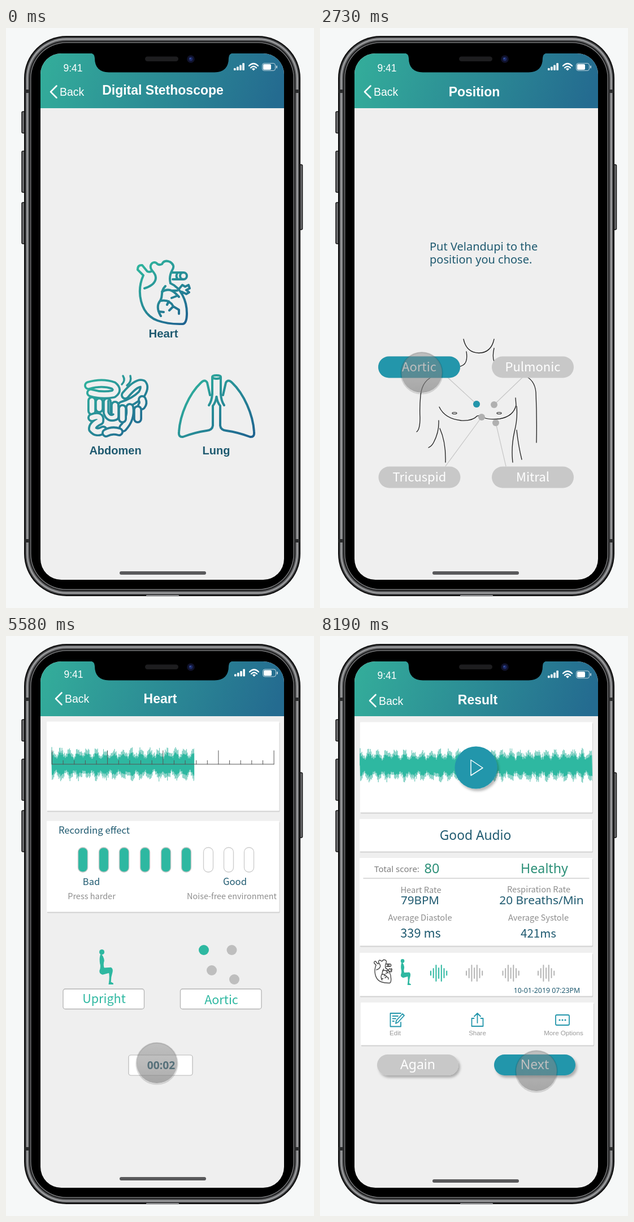
These frames come from a looping animation (545 by 1027 pixels, 8220 ms). An HTML page:

```html
<!DOCTYPE html>
<html lang="en">
<head>
<meta charset="utf-8">
<title>Digital Stethoscope</title>
<style>
html, body { margin: 0; width: 100%; height: 100%; overflow: hidden; background: #f6f8f8; }
svg { display: block; width: 545px; height: 1027px; }
.l { font-family: "Liberation Sans", Arial, sans-serif; }
.b { font-family: "Liberation Sans", Arial, sans-serif; font-weight: bold; }
.n { font-family: "Noto Sans", "Open Sans", sans-serif; }
.c { font-family: "Noto Sans CJK SC", "Noto Sans CJK JP", "Noto Sans CJK", sans-serif; }
.line { fill: none; stroke-linecap: round; stroke-linejoin: round; }
</style>
</head>
<body>
<svg id="stage" viewBox="0 0 545 1027"></svg>
<script>
const INK = '#1f5a70', TEAL = '#2eb8a1', BLUE = '#2396ab', GRAY = '#c8c8c8';
const $ = id => document.getElementById(id);

// ---- drawing helpers ----
const text = (x, y, size, str, fill = INK, cls = 'n', anchor = 'middle') =>
  `<text x="${x}" y="${y}" font-size="${size}" fill="${fill}" class="${cls}" text-anchor="${anchor}">${str}</text>`;
const rect = (x, y, w, h, r, fill, more = '') =>
  `<rect x="${x}" y="${y}" width="${w}" height="${h}" rx="${r}" fill="${fill}" ${more}/>`;
const dot = (x, y, r, fill, more = '') => `<circle cx="${x}" cy="${y}" r="${r}" fill="${fill}" ${more}/>`;
const line = (d, stroke, width, more = '') =>
  `<path class="line" d="${d}" stroke="${stroke}" stroke-width="${width}" ${more}/>`;
const group = (id, body, more = '') => `<g id="${id}" ${more}>${body}</g>`;
const card = (x, y, w, h) => rect(x + 1, y + 2, w, h, 1, '#d2d2d2') + rect(x, y, w, h, 1, '#fff');
const pill = (x, y, w, h, fill, label, by, cls, size, more = '') =>
  rect(x, y, w, h, h / 2, fill, more) + text(x + w / 2, by, size, label, '#fff', cls);
const noise = i => { const v = Math.sin(i * 12.9898) * 43758.5453; return v - Math.floor(v); };

function header(title, cx, base, o = {}) {
  const { sx = 0, sy = 0, bx = 0, by = 0, hx = 201, hy = 965 } = o;
  const bars = [4, 6.5, 9.5, 13].map((h, i) => rect(403 + i * 5.1, 75 - h, 3.6, h, 1, '#fff')).join('');
  return rect(61, 45, 431, 97, 0, 'url(#head)') +
    `<g transform="translate(${sx} ${sy})">` + text(118.5, 77, 17.5, '9:41', '#fff', 'l') + bars +
    line('M430 67 Q438 59 446 67 M433 70.5 Q438 65.5 443 70.5', '#fff', 2.3) +
    '<path d="M435 72.5 Q438 70 441 72.5 L438 75.5Z" fill="#fff"/>' +
    rect(453.5, 62.5, 23, 13, 3.5, 'none', 'stroke="#fff" stroke-opacity=".7"') +
    rect(455, 64, 14, 10, 2, '#fff') + rect(478, 66.5, 2, 5, 1, '#fff', 'opacity=".7"') + '</g>' +
    `<g transform="translate(${bx} ${by})">` + line('M89.5 102.5 L79 113 L89.5 123.5', '#fff', 2.6) +
    text(95, 120, 19.5, 'Back', '#fff', 'l', 'start') + '</g>' +
    text(cx, base, 23, title, '#fff', 'b') + rect(hx, hy - 3, 153, 6, 3, '#59595b');
}

// Dense zigzag: pale full-height layer under a solid core
function wave(x0, x1, cy) {
  const layer = k => {
    let d = `M${x0} ${cy}`;
    for (let x = x0, i = 0; x < x1; x += 1.5, i++) {
      const beat = .38 + .34 * Math.abs(Math.cos(Math.PI * (x - x0) / 15.7)) ** 2;
      const up = 31 * k * (beat + .28 * noise(i + 1)), down = 31 * k * (beat + .28 * noise(i + 500));
      d += `L${x.toFixed(1)} ${(cy - up).toFixed(1)}L${(x + .7).toFixed(1)} ${(cy + down).toFixed(1)}`;
    }
    return d;
  };
  return line(layer(1), '#54bfae', 1, 'opacity=".65"') + line(layer(.68), TEAL, 1.5);
}

// ---- icons ----
const heart = line(`M233 428 Q233 419 241 420 L250 431 Q254 433 259 430 M233 428 L243 438
  C231 465 236 506 268 518 Q288 525 313 524 Q320 523 320 505 C320 482 309 460 291 452
  M259 430 C252 422 258 412 266 416 Q270 421 276 418 Q280 410 290 414 Q300 420 294 429 Q288 440 291 452
  M259 430 C272 444 262 456 245 461
  M295 433 H313 M295 445 H313 M304 433 Q299 439 304 445 M308 439 A6 6 0 1 0 320 439 A6 6 0 1 0 308 439
  M307 461 L312 455 L317 458 L323 455 L325 461 L319 464 L324 468 L319 471 L311 467
  M282 457 C272 467 279 476 272 484 C267 491 268 500 274 510 M276 467 Q289 459 300 470 L306 476 M294 465 L303 465
  M273 483 Q290 480 296 493 L289 500 M296 493 L306 499 V506 M285 490 L288 484 M270 502 L279 503 M301 475 L293 478`,
  'inherit', 4);

const tubes = [
  'M146 633 Q170 626 190 633 Q200 641 190 648 Q170 652 150 646', 'M152 660 V678', 'M165 662 V674',
  'M179 662 V681 Q182 692 193 688 V668', 'M205 668 Q226 662 240 648 Q247 636 242 630 Q232 625 211 650',
  'M241 658 Q244 664 240 669', 'M233 676 V692', 'M219 672 Q222 692 207 708', 'M206 674 V692',
  'M152 690 Q168 684 166 696 Q153 702 153 710 Q160 719 172 712', 'M177 717 Q188 711 200 715'];
const abdomen = tubes.map(d => line(d, 'url(#organ)', 16) + line(d, '#efefef', 8.5)).join('') +
  line('M205 631 Q212 624 207 616 M214 633 Q223 626 220 616 M181 660 V680 Q184 688 190 684', 'url(#organ)', 3.5);

const lung = line(`M313 724 Q305 725 306 715 C308 684 324 648 345 628 Q352 621 356 628 L361 650
  M365 618 V648 Q364 661 359 668 M372.5 653 Q371 663 366 669 V704 Q365 712 355 713 Q334 716 313 724
  M365 618 Q365 615 372.5 615 M365 618 Q366 621 372.5 621`, 'inherit', 4);

const sitter = `<path d="M158 599 Q166 603 167 616 Q164 625 167 633 L184 632 Q190 635 188 644 Q184 656 184 668 L190 671
  V674 H178 Q181 658 179 646 L163 650 Q154 648 155 640 Q159 630 156 622 Q154 607 158 599Z"/><circle cx="161" cy="594.5" r="6.5"/>`;
const sitAt = (x, y, sx, sy, fill) =>
  `<g fill="${fill}" transform="translate(${x} ${y}) scale(${sx} ${sy}) translate(-153 -588)">${sitter}</g>`;

// ---- screens ----
const organs = header('Digital Stethoscope', 277.5, 118) +
  `<g stroke="url(#organ1)">${heart}</g>` + abdomen +
  `<g stroke="url(#organ2)">${lung}</g><g stroke="url(#organ3)" transform="translate(745 0) scale(-1 1)">${lung}</g>` +
  text(278.5, 548, 20.4, 'Heart', INK, 'b') + text(193.5, 755, 20, 'Abdomen', INK, 'b') + text(372, 755, 20, 'Lung', INK, 'b');

const upright = fill => sitAt(153, 588, 1, 1, fill) + pill(96, 697, 153, 38, fill, 'Upright', 723, 'n', 23.2);
const posture = header('Posture', 273, 121) +
  text(141, 394, 20, 'Choose the position you will', INK, 'n', 'start') +
  text(141, 417, 20, 'be diagnosed with.', INK, 'n', 'start') +
  upright(GRAY) + group('uprightOn', upright(BLUE)) +
  `<path d="M326 645 Q327 638 335 638 Q340 641 344 638 Q355 636 362 641 Q372 637 385 638 Q395 640 402 643 Q420 646 428 647
    L433 640 L435 642 Q434 650 430 652 Q410 650 400 651 Q380 654 362 650 Q350 654 340 649 Q327 654 326 645Z" fill="${GRAY}" stroke="#a9cdd8" stroke-width=".8"/>` +
  pill(303, 696.5, 154.5, 38, GRAY, 'Laying Down', 723, 'c', 22.2, 'stroke="#b4d0da" stroke-width=".8"');

const site = (x, y, label, fill = GRAY) => pill(x, y, 145, 38, fill, label, y + 26, 'c', 22);
const position = header('Position', 273, 121, { hx: 199 }) +
  text(194, 394, 20, 'Put Velandupi to the', INK, 'n', 'start') +
  text(194, 417, 20, 'position you chose.', INK, 'n', 'start') +
  line('M226 619 L277 666 M358 619 L308 667 M222 776 L286 689 M329 776 L311 699', '#c6c6c6', 1.2) +
  line(`M254 551 Q259 575 281 575.5 Q303 575 308 551 M259 573 Q262 592 253 597 Q248 600 242 601
    M308 567 Q303 589 313 598 M205 615 Q181 622 178 650 Q176 672 177 690 Q177 711 171 715
    M360 615 Q380 622 382 645 Q384 690 383 734 M211 671 Q221 692 250 695 Q270 696 278 687 Q284 685 290 690 Q300 694 318 692
    Q342 688 347 668 L346 655 M210 695 Q211 715 201 734 Q198 740 192 743 M212 709 Q223 733 222 769
    M348 670 Q350 692 344 715 Q338 742 341 769 M348 712 Q351 740 357 764`, '#1c1c1c', 1.3) +
  '<g fill="none" stroke="#1c1c1c" stroke-width="1.2"><ellipse cx="238" cy="682" rx="4" ry="1.5"/><ellipse cx="317" cy="682" rx="4" ry="1.5"/></g>' +
  [[277, 666], [308, 667], [286, 689], [311, 699]].map(p => dot(...p, 6, '#b0b0b0')).join('') +
  site(103, 581.5, 'Aortic') + site(304, 581.5, 'Pulmonic') + site(103.5, 776.5, 'Tricuspid') + site(304, 776.5, 'Mitral') +
  group('aorticOn', dot(277, 666, 6, BLUE) + site(103, 581.5, 'Aortic', BLUE));

let ruler = 'M81.5 227 H474';
for (let i = 0; i <= 20; i++) ruler += `M${(81.5 + i * 19.63).toFixed(1)} 227 V${i % 5 ? 220.5 : 203}`;
const slots = [136, 173, 209, 246, 283, 319, 358, 394, 430];
const slot = (x, fill, more = '') => rect(x - 8.5, 374.5, 17, 43.5, 8, fill, `stroke="#cbcbcb" stroke-width="1.3" ${more}`);
const box = (x, label, by) => rect(x, 625, 143.5, 35.5, 4, '#fff', 'stroke="#b4b4b4" stroke-width="1.3"') +
  text(x + 72.5, by, 21.6, label, TEAL, 'c');
const raised = 'filter="url(#drop)"';
const record = header('Heart', 273, 119, { sx: 1, sy: -3.5, bx: 9, by: -2, hy: 961 }) +
  card(72, 151.5, 411.5, 158) + `<g clip-path="url(#progress)">${wave(81, 474, 227)}</g>` + line(ruler, '#555', 1) +
  card(72, 327.5, 411.5, 161) + text(156, 350, 16.7, 'Recording effect', INK, 'c') +
  slots.map(x => slot(x, '#fff')).join('') + slots.slice(0, 6).map((x, i) => slot(x, TEAL, `id="slot${i}"`)).join('') +
  text(151, 440.5, 16.5, 'Bad', INK, 'c') + text(405, 440.5, 16.7, 'Good', INK, 'c') +
  text(151.5, 466, 14.5, 'Press harder', '#8e8e8e', 'c') + text(399.5, 466, 14.4, 'Noise-free environment', '#8e8e8e', 'c') +
  sitAt(164, 555, .7, .72, TEAL) + dot(350, 556, 9, TEAL) +
  [[399.5, 556], [364, 592], [404, 608]].map(p => dot(...p, 9, '#bebebe')).join('') +
  box(101, 'Upright', 649.5) + box(308.5, 'Aortic', 652) +
  group('timer', rect(-56.5, -18, 113, 36, 4, '#fff', 'stroke="#b8b8b8" stroke-width="1.2"') +
    `<text id="clock" class="n" x="1" y="7" font-size="19.2" font-weight="bold" fill="${INK}" text-anchor="middle"></text>`) +
  group('choices', pill(101, 741, 144, 37, GRAY, 'Again', 767, 'n', 23, raised) +
    pill(308, 741, 144, 37, BLUE, 'Analyze', 767, 'n', 23.3, raised));

const pulse = (x, fill) => [9, 18, 30, 20, 30, 18, 9].map((h, i) =>
  rect(x - 15 + i * 4.7, 597 - h / 2, 2, h, 1, fill)).join('');
const rows = [
  card(71, 152.5, 411, 160) + wave(71, 481, 229),
  card(70, 324, 412, 57.5) + text(275, 360.5, 22.8, 'Good Audio'),
  card(70, 393, 412, 155.5) + text(136, 418, 15, 'Total score:', '#7d7d7d') + text(198, 419.5, 23.4, '80', '#2b8f77') +
    text(397, 419.5, 23.2, 'Healthy', '#2b8f77') + line('M77 429 H476', '#cfcfcf', 1.5) +
    text(178.5, 455, 14.7, 'Heart Rate', '#8e8e8e', 'c') + text(177, 475, 20.6, '79BPM') +
    text(387, 453.5, 14.7, 'Respiration Rate', '#8e8e8e', 'c') + text(392, 475, 20.8, '20 Breaths/Min') +
    text(177, 503.5, 14.7, 'Average Diastole', '#8e8e8e', 'c') + text(178, 533.5, 21.8, '339 ms', INK, 'c') +
    text(386.5, 503.5, 14.7, 'Average Systole', '#8e8e8e', 'c') + text(386.5, 533.5, 20.6, '421ms', INK, 'c'),
  card(70, 561, 412, 76.5) +
    `<g stroke="#454545" transform="translate(95 573) scale(.345 .37) translate(-231 -412)">${heart}</g>` +
    sitAt(142, 572, .51, .535, TEAL) + pulse(210, TEAL) + pulse(273, '#b4b4b4') + pulse(337.5, '#b4b4b4') + pulse(400, '#b4b4b4') +
    text(401.5, 632, 12.3, '10-01-2019 07:23PM'),
  card(72, 649, 412, 75.5) +
    line('M143 668 H124.5 V691.5 H143 V684 M128.5 673 H138 M128.5 677.5 H134 M128.5 682 H131 M134 686 L135 681 L146 669 L149 672 L138 684Z M268.5 677 V691 H288.5 V677 M268.5 677 H272.5 M284.5 677 H288.5 M278.5 685 V668.5 M273 673.5 L278.5 668 L284 673.5', BLUE, 1.8) +
    rect(417, 671, 24, 18, 2, 'none', `stroke="${BLUE}" stroke-width="1.8"`) +
    [424, 429, 434].map(x => dot(x, 680, 1.6, BLUE)).join('') +
    text(133, 706.5, 11.5, 'Edit', '#9a9a9a', 'l') + text(278.5, 706.5, 11.5, 'Share', '#9a9a9a', 'l') +
    text(431, 706.5, 11.6, 'More Options', '#9a9a9a', 'l'),
  pill(101, 741, 144, 37, GRAY, 'Again', 767, 'n', 23, raised) + pill(308, 741, 144, 37, BLUE, 'Next', 767, 'n', 23, raised)];
const result = header('Result', 279, 121, { sy: -.7, bx: 9, by: 1.5, hx: 199 }) +
  rows.map((r, i) => group('row' + i, r)).join('') +
  group('play', dot(0, 0, 37.5, BLUE, raised) + line('M-9 -13.5 V14 L12 .5Z', '#fff', 1.5));

const screens = [organs, posture, position, record, result];

// ---- phone ----
const ring = (i, fill) => rect(32 + i, 14 + i, 489 - 2 * i, 992 - 2 * i, 75 - i, fill);
const phone = [[148, 38], [218, 73], [309, 73]].map(([y, h]) => rect(28, y, 8, h, 2, '#6d6e70', 'stroke="#151515" stroke-width="1.5"')).join('') +
  rect(516, 242, 8.5, 115, 2, '#6d6e70', 'stroke="#151515" stroke-width="1.5"') +
  ring(0, '#0c0c0c') + ring(2, '#3f4042') + ring(4, '#98999b') + ring(7, '#5b5c5e') + ring(9, '#1b1b1c') + ring(11, '#77787a') + ring(12.5, '#000') +
  [[33, 109], [511, 109], [33, 905], [511, 905]].map(([x, y]) => rect(x, y, 9, 6, 0, '#2a2b2c')).join('') +
  rect(248, 1004, 58, 2.5, 1, '#8b8c8e');
const notch = '<path d="M148 44 Q157 45 157 53 Q157 78 182 78.5 H369 Q394 78 394 53 Q394 45 403 44Z"/>' +
  rect(246, 50.5, 59, 8.5, 4.2, '#1d1d1f') + dot(327, 55, 6.8, '#10122b') + dot(327, 55, 3.4, '#1c2a66') + dot(326, 54, 1.3, '#3c57a8');

const gradient = (id, x1, y1, x2, y2, a, b) =>
  `<linearGradient id="${id}" gradientUnits="userSpaceOnUse" x1="${x1}" y1="${y1}" x2="${x2}" y2="${y2}">
   <stop stop-color="${a}"/><stop offset="1" stop-color="${b}"/></linearGradient>`;
$('stage').innerHTML = '<defs>' +
  gradient('head', 85, 30, 468, 160, '#33ab9a', '#246b90') +
  gradient('organ1', 240, 420, 320, 520, '#2fb39d', '#1f6390') +
  gradient('organ', 140, 620, 240, 725, '#2fb39d', '#1f6390') +
  gradient('organ2', 315, 630, 420, 725, '#2fb39d', '#1f6390') +
  gradient('organ3', 420, 600, 315, 730, '#2fb39d', '#1f6390') +
  gradient('finger', 0, -36, 0, 36, 'rgba(135,135,135,.46)', 'rgba(125,125,125,.64)') +
  `<clipPath id="screen">${rect(61, 45, 431, 932, 37)}</clipPath>
   <clipPath id="progress"><rect id="wiped" x="80" y="160" width="0" height="140"/></clipPath>
   <filter id="drop" x="-20%" y="-30%" width="140%" height="180%"><feDropShadow dx="3" dy="4" stdDeviation="2" flood-opacity=".28"/></filter></defs>` +
  phone + '<g clip-path="url(#screen)">' +
  screens.map((s, i) => group('screen' + i, rect(61, 45, 431, 932, 0, '#efefef') + s)).reverse().join('') + '</g>' + notch +
  group('finger1', dot(0, 1, 36.5, 'none', 'stroke="#000" stroke-opacity=".13" stroke-width="2.5"') + dot(0, 0, 36, 'url(#finger)'));

// ---- motion ----
const LOOP = 8220, WIDTH = 430;
const cuts = [812, 1858, 2915, 7408], CUT = 230;
const touches = [[150, 630, 291, 504], [1200, 1680, 180, 675], [2220, 2670, 180, 610], [3210, 3690, 265, 756],
  [3810, 4110, 267, 756], [6600, 7080, 383, 757], [7410, 7520, 383, 770]];
const rowStarts = [7182, 7333, 7401, 7471, 7535, 7590];

const ramp = (t, a, b) => Math.min(1, Math.max(0, (t - a) / (b - a)));
const smooth = (t, a, b) => { const u = ramp(t, a, b); return u * u * (3 - 2 * u); };
const remain = (t, start) => (1 - ramp(t, start, start + 590)) ** 3;
const move = (id, x, y, s = 1) => $(id).setAttribute('transform', `translate(${x} ${y}) scale(${s})`);
const fade = (id, v) => $(id).setAttribute('opacity', v);

function draw(t) {
  screens.forEach((_, i) => {
    const gone = i < cuts.length ? smooth(t, cuts[i], cuts[i] + CUT) : 0;
    const live = gone < 1 && (i === 0 || t > cuts[i - 1]);
    $('screen' + i).style.display = live ? '' : 'none';
    move('screen' + i, -WIDTH * gone, 0);
  });

  fade('uprightOn', smooth(t, 1590, 1680));
  fade('aorticOn', ramp(t, 2670, 2730));

  const p = ramp(t, 3990, 6470), grow = smooth(t, 3810, 4110), done = ramp(t, 6470, 6600);
  $('wiped').setAttribute('width', 1 + 393 * p);
  $('clock').textContent = '00:0' + Math.ceil(5 * (1 - p));
  move('timer', 273.5 + 5 * (1 - grow), 760, grow);
  fade('timer', grow * (1 - done));
  fade('choices', done);
  for (let i = 0; i < 6; i++) fade('slot' + i, i ? ramp(t, 3596 + 316 * i, 3912 + 316 * i) : ramp(t, 3810, 3930));

  rowStarts.forEach((s, i) => move('row' + i, WIDTH * remain(t, s), 0));
  move('play', 276 + WIDTH * remain(t, rowStarts[0]), 233, 1 - remain(t, 7418));

  let x = 441, y = 719;
  for (const [a, b, tx, ty] of touches) {
    const k = smooth(t, a, b);
    x += (tx - x) * k;
    y += (ty - y) * k;
  }
  move('finger1', x, y);
  fade('finger1', ramp(t, 140, 240));
}

const start = performance.now();
function tick() {
  draw((performance.now() - start) % LOOP);
  requestAnimationFrame(tick);
}
tick();
</script>
</body>
</html>
```
